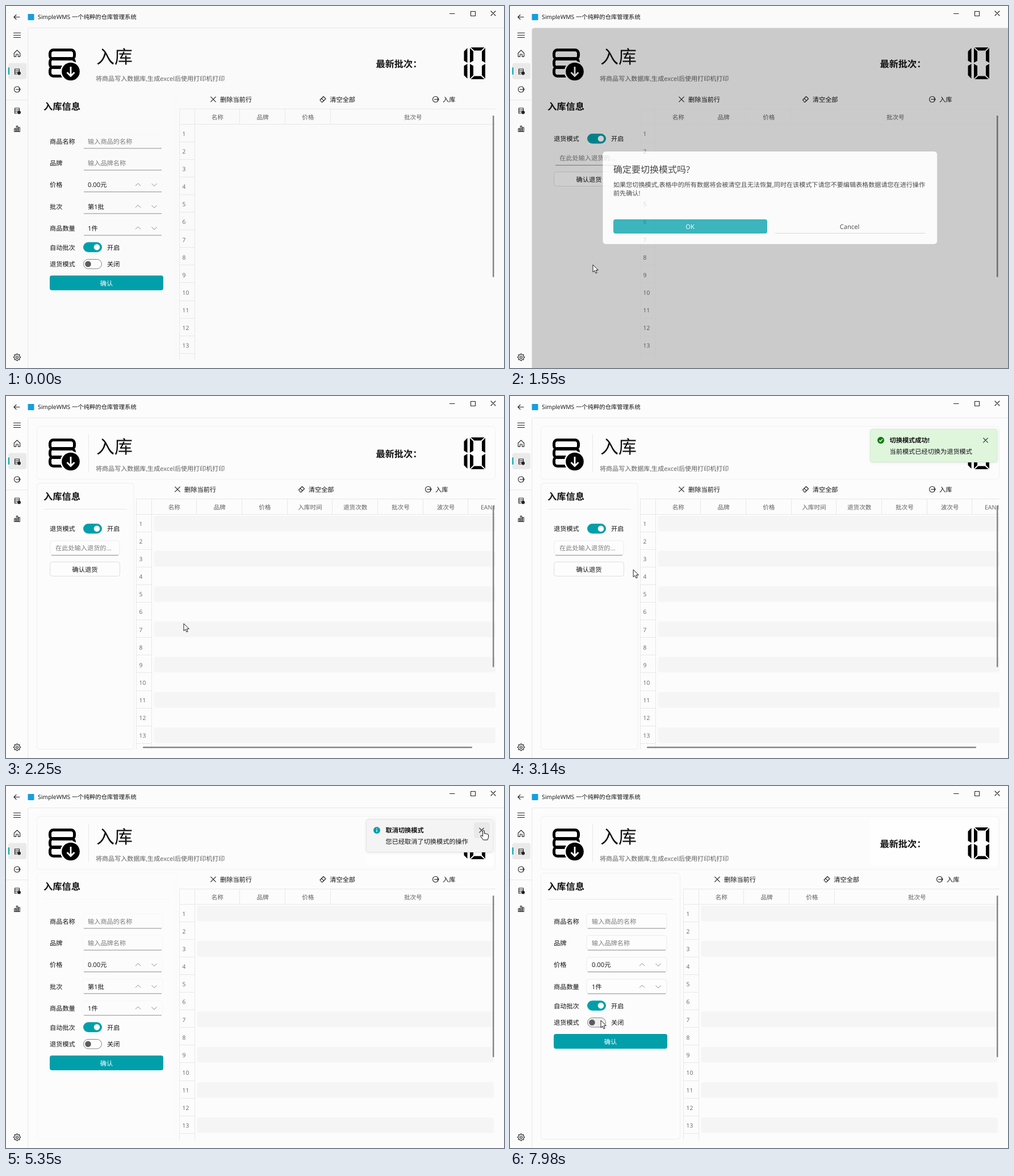
Recreate the animation shown at these times as an HTML page. Size 877 by 638 pixels, loop 8000 ms.

```html
<!DOCTYPE html>
<html lang="zh-CN">
<head>
<meta charset="utf-8">
<title>SimpleWMS</title>
<style>
html, body { margin: 0; width: 100%; height: 100%; overflow: hidden; background: #fafafa; }
svg { display: block; width: 877px; height: 638px; }
text { font-family: "Open Sans", "Noto Sans CJK SC", "Noto Sans CJK", sans-serif; text-rendering: geometricPrecision; white-space: pre; }
.ic { fill: none; stroke: #222; stroke-width: 1.1; stroke-linecap: round; stroke-linejoin: round; }
.line { stroke: #e8e8e8; stroke-width: 1; fill: none; }
</style>
</head>
<body>
<svg id="stage" viewBox="0 0 877 638" xmlns="http://www.w3.org/2000/svg"></svg>
<script>
const LOOP = 8000, TEAL = '#009faa', HOVER = '#29b4bf', ROW = 31.1, COL = 79.7, LIFT = 38;
const $ = id => document.getElementById(id);

// ---- markup helpers; text is placed by its vertical centre, on whole-pixel baselines ----
const text = (x, y, s, { size = 11.2, fill = '#111', anchor = 'start', weight = 400, id = '' } = {}) =>
  `<text ${id && `id="${id}"`} x="${x}" y="${Math.round(y + size * 0.38)}" font-size="${size}" fill="${fill}" text-anchor="${anchor}" font-weight="${weight}">${s}</text>`;
const mid = (x, y, s, o = {}) => text(x, y, s, { anchor: 'middle', ...o });
const rect = (x, y, w, h, fill, rx = 0, more = '') =>
  `<rect x="${x}" y="${y}" width="${w}" height="${h}" rx="${rx}" fill="${fill}" ${more}/>`;
const path = (d, more = 'class="ic"') => `<path d="${d}" ${more}/>`;
const line = d => path(d, 'class="line"');
const group = (id, body, more = '') => `<g id="${id}" ${more}>${body}</g>`;
const at = (x, y, body) => `<g transform="translate(${x} ${y})">${body}</g>`;
const cross = (x, y, r) => path(`M${x - r} ${y - r}l${2 * r} ${2 * r}m0 ${-2 * r}l${-2 * r} ${2 * r}`);

// ---- icons, centred on 0,0 ----
const exitIcon = '<circle r="5" class="ic" stroke-dasharray="27 4.4" stroke-dashoffset="-2.2"/>' + path('M-2 0H5.6M3.4-2.2L5.6 0L3.4 2.2');
const eraser = path('M-5 1L1-5L5-1L-1 5H-2Z M-2.4-1.6L1.6 2.4');
const stack = path('M-4.5-4.5h8v3h-8zM-4.5-1.5h8v3h-8zM-1 4.5h-3.5v-3h4');
const home = path('M-5.2-.5L0-5.6L5.2-.5V5.6H1.8V1.5H-1.8V5.6H-5.2Z');
const bars = path('M-4.8 5V-.5h2.4V5zM-1.2 5V-5h2.4V5zM2.4 5V-2.5h2.4V5z');
const dot = '<circle cx="3" cy="3" r="3" fill="#222"/>';
const gear = () => {
  let d = '';
  for (let i = 0; i < 32; i++) {
    const a = (i - 0.5) * Math.PI / 16, r = i % 4 < 2 ? 6 : 4.6;
    d += `${i ? 'L' : 'M'}${(r * Math.cos(a)).toFixed(2)} ${(r * Math.sin(a)).toFixed(2)}`;
  }
  return path(d + 'Z') + '<circle r="2" class="ic"/>';
};

const chrome = () =>
  line('M38.5 638V42Q38.5 38.5 42.5 38.5H877M0 165.5H38') +
  path('M14 19.5H24M18 15.5L14 19.5L18 23.5') +
  rect(38.5, 14, 11, 11, '#159fe0', 1) +
  text(56, 19, 'SimpleWMS 一个纯粹的仓库管理系统', { size: 10.35 }) +
  path('M781.5 13.5H790M818.5 9.5H826.5V17.5H818.5Z') + cross(858, 13, 4) +
  rect(4, 100.5, 32, 28.5, '#eaeaea', 4) + rect(4, 108, 2, 13, TEAL, 1) +
  path('M13.5 47.5H25.5M13.5 51.5H25.5M13.5 55.5H25.5') +
  at(19.5, 83.5, home) + at(20, 115.5, stack + dot) + at(19.5, 147, exitIcon) +
  at(20, 184.5, stack + dot) + at(19.5, 216.5, bars) + at(19.5, 619, gear());

// ---- LCD digits: each segment is a trapezoid ----
const side = (x, y, dir) => `M${x} ${y}V${y + 26}L${x + 6 * dir} ${y + 22.5}V${y + 6}Z`;
const sideLow = (x, y, dir) => `M${x} ${y}V${y - 26}L${x + 6 * dir} ${y - 22.5}V${y - 6}Z`;
const lcd = () => path(
  side(812.5, 74, -1) + sideLow(812.5, 128, -1) +
  side(817, 74, 1) + sideLow(817, 128, 1) + side(844, 74, -1) + sideLow(844, 128, -1) +
  'M818.5 73H842.5L836.5 78.5H824.5ZM818.5 129H842.5L836.5 123.5H824.5Z', 'fill="#000"');

const header = () => {
  const box = y => rect(77.5, y, 43, 16, 'none', 6, 'stroke="#000" stroke-width="5"');
  return box(77.5) + box(92.5) + box(107.5) +
    '<circle id="halo" cx="114" cy="115.5" r="18.5"/><circle cx="114" cy="115.5" r="15.8"/>' +
    path('M114 107V123M107.5 117L114 123.5L120.5 117', 'fill="none" stroke="#fff" stroke-width="2.8"') +
    text(159, 89, '入库', { size: 32 }) +
    text(158, 128, '将商品写入数据库,生成excel后使用打印机打印', { size: 11.05, fill: '#5f5f5f' }) +
    text(651.5, 101.5, '最新批次：', { size: 16.2, weight: 700 }) + lcd() +
    text(66, 176.5, '入库信息', { size: 16.3, weight: 700 });
};

// ---- form parts ----
const field = (x, y, w, fill = '#fdfdfd') =>
  rect(x, y - 13, w, 26, fill, 4, 'stroke="#ececec" class="soft"') +
  path(`M${x + 2} ${y + 12.6}H${x + w - 2}`, 'stroke="#8f8f8f"');
const label = (y, s) => text(77, y, s);
const input = (y, name, hint) => label(y, name) + field(135, y, 141) + text(144, y, hint, { fill: '#7d7d7d' });
const spin = (y, name, value) => label(y, name) + field(135, y, 141) + text(144, y, value) +
  path(`M228 ${y + 2}l4.5-4.5l4.5 4.5M256.5 ${y - 2}l4.5 4.5l4.5-4.5`, 'fill="none" stroke="#8a8a8a"');
const toggle = (id, y, name) => label(y, name) +
  rect(136.5, y - 8.5, 32, 16.5, TEAL, 8.25, `id="${id}Track"`) +
  `<circle id="${id}Knob" cy="${y - 0.2}" r="5.3"/>` + text(178, y, '', { id: id + 'Text' });

function setToggle(id, on, x, hover) {
  const track = $(id + 'Track'), knob = $(id + 'Knob');
  track.setAttribute('fill', on ? TEAL : hover ? '#efefef' : '#fcfcfc');
  track.setAttribute('stroke', on ? TEAL : '#858585');
  knob.setAttribute('cx', x);
  knob.setAttribute('fill', on ? '#fff' : '#5d5d5d');
  $(id + 'Text').textContent = on ? '开启' : '关闭';
}

const panel = w => rect(54.5, 153.5, w, 469, 'none', 5, 'stroke="#eeeeee" class="soft"') +
  path(`M66 199.5H${54 + w - 12}`, 'class="line soft"');

function table(key, x, cols, wide, bars) {
  const y0 = 181.5, top = 208.5, left = x + 27, right = 862;
  let stripes = '', rules = `M${x} ${y0}H${right}M${x} ${top}H${right}M${x} ${y0}V623M${left} ${y0}V623`, nums = '', heads = '';
  for (let i = 0; i < 13; i++) {
    const y = top + i * ROW;
    if (i % 2 === 0) stripes += rect(left + 4, y + 2.5, (wide ? 862 : 859) - left - 4, 27.5, '#f5f5f5', 4, i === 4 ? `id="${key}Fifth"` : '');
    rules += `M${x} ${Math.round(y + ROW) - 0.5}H${left}`;
    nums += text(x + 5, 225 + i * ROW, i + 1, { size: 10.3, fill: '#666' });
  }
  cols.forEach((s, i) => {
    if (i) rules += `M${Math.round(left + i * COL) - 0.5} ${y0}V${top}`;
    const last = !wide && i === 3;
    heads += mid(last ? (left + 3 * COL + right) / 2 : left + (i + 0.5) * COL - (i > 6 ? 2 : 0), 195.5, s, { size: 10.6, fill: '#606060' });
  });
  const [a, b, c] = bars;
  return `<g class="stripes">${stripes}</g><g class="grid">${line(rules)}</g>${nums}<g clip-path="url(#tableClip)">${heads}</g>` +
    cross(a, 164.5, 4.3) + text(a + 12, 164.3, '删除当前行') +
    at(b, 164.5, eraser) + text(b + 12.3, 164.3, '清空全部') +
    at(c, 164.5, exitIcon) + text(c + 12.5, 164.3, '入库');
}

const scrollbar = rect(857, 193, 2.5, 285, '#868686', 1.2);
const shortCols = ['名称', '品牌', '价格', '批次号'];
const longCols = ['名称', '品牌', '价格', '入库时间', '退货次数', '批次号', '波次号', 'EAN13'];

const stockView = () => panel(245) +
  input(238.3, '商品名称', '输入商品的名称') + input(276.6, '品牌', '输入品牌名称') +
  spin(315, '价格', '0.00元') + group('batch', spin(353.3, '批次', '第1批')) +
  group('lower', spin(391.5, '商品数量', '1件') +
    toggle('auto', 425.3, '自动批次') + toggle('mode', 455, '退货模式') +
    rect(77, 475, 200, 26, TEAL, 4, 'id="confirm"') + mid(177, 488.3, '确认', { fill: '#fff' })) +
  table('stock', 305.5, shortCols, false, [365, 558, 756.5]);

const returnView = () => panel(170.5) + toggle('back', 234, '退货模式') +
  field(78, 268, 122) + text(87, 268, '在此处输入退货的...', { fill: '#7d7d7d' }) +
  rect(77.5, 292.5, 123, 25, '#fdfdfd', 4, 'stroke="#dedede"') + mid(139, 305.5, '确认退货') +
  group('narrow', table('narrow', 229.5, shortCols, false, [302, 520.5, 743.5])) +
  group('broad', table('broad', 229.5, longCols, true, [302, 520.5, 743.5]) + rect(241, 618, 580, 2.5, '#868686', 1.2));

// ---- overlays ----
const toast = (id, fill, edge, color, mark, title, body) => group(id,
  rect(0.5, 0.5, 223.5, 58, fill, 4, `stroke="${edge}" filter="url(#shade)"`) +
  rect(190, 6, 28, 28, '#e9e9e9', 4, `id="${id}Hover" visibility="hidden"`) +
  `<circle cx="19" cy="20" r="6" fill="${color}"/>` + path(mark, 'fill="none" stroke="#fff" stroke-width="1.3"') +
  text(34.5, 20, title, { weight: 700 }) + text(34.5, 39.5, body) + cross(203.5, 20, 3.8));

const box = 'M169.5 256H746Q752.5 256 752.5 262.5V413.5Q752.5 420 746 420H169.5Q163 420 163 413.5V262.5Q163 256 169.5 256Z';
const dialog = () => path(box, 'fill="#fcfcfc" stroke="#9a9a9a" stroke-opacity=".4"') +
  text(182, 287.5, '确定要切换模式吗?', { size: 16 }) +
  text(182, 314.3, '如果您切换模式,表格中的所有数据将会被清空且无法恢复,同时在该模式下请您不要编辑表格数据请您在进行操作', { size: 11.1 }) +
  text(182, 329.3, '前先确认!', { size: 11.1 }) +
  rect(182, 376, 271, 25, TEAL, 4, 'id="ok"') + mid(317, 388.5, 'OK', { fill: '#fff' }) +
  path('M467 400.5H731', 'stroke="#cfcfcf"') + mid(598, 388.5, 'Cancel');

const hint = (id, x, y, w, s) => group(id, rect(x, y, w, 28, '#f9f9f9', 4, 'stroke="#dcdcdc" filter="url(#shade)"') + mid(x + w / 2, y + 14, s));

const pointers =
  group('arrow', path('M0 0V13L3 10.3L5 15L7.2 14L5.2 9.5H9.3Z', 'fill="#fff" stroke="#111" stroke-width=".95"')) +
  group('beam', path('M-3-6.5H-1Q0-6.5 0-5.5Q0-6.5 1-6.5H3M0-5.5V5.5M-3 6.5H-1Q0 6.5 0 5.5Q0 6.5 1 6.5H3', 'fill="none" stroke="#222" stroke-width="1.1"')) +
  group('hand', path('M-1.4.8Q0-1.2 1.4.8V6Q3 4.8 4 6.3Q5.6 5.4 6.3 7Q8.6 6.6 8.6 9V12.5L7 17H-.6L-5 10.8Q-5.4 8.6-3.4 9L-1.4 11Z', 'fill="#fff" stroke="#111" stroke-width="1"'));

// The veil leaves the dialog's own area undimmed.
$('stage').innerHTML =
  '<defs><clipPath id="tableClip"><rect x="229" y="181" width="633" height="28"/></clipPath>' +
  '<filter id="shade" x="-5%" y="-20%" width="110%" height="150%"><feDropShadow dx="0" dy="1" stdDeviation="2" flood-opacity=".08"/></filter></defs>' +
  rect(0, 0, 877, 638, '#fafafa', 0, 'id="ground"') + chrome() +
  group('card', rect(54.5, 53.5, 807, 93.5, 'none', 5, 'stroke="#f1f1f1"') + line('M145.5 67V134')) +
  rect(634, 58, 224, 82, '#fefefe', 0, 'id="patch"') + header() +
  group('stockView', stockView()) + group('returnView', returnView()) + scrollbar +
  path('M39 638V43Q39 39 43 39H877V638Z' + box, 'id="dim" fill-rule="evenodd"') + group('dialog', dialog()) +
  toast('done', '#dff6dd', '#d3ead1', '#0f7b0f', 'M16.3 20.2L18.3 22.2L22 18', '切换模式成功!', '当前模式已经切换为退货模式') +
  toast('info', '#f4f4f4', '#e3e3e3', TEAL, 'M19 19V23.2M19 16.6V17.9', '取消切换模式', '您已经取消了切换模式的操作') +
  hint('autoTip', 66, 373, 276, '开启后将自动使用最新的批次号,无需再手动填写') +
  hint('modeTip', 62, 368, 286, '开启后将切换为退货模式,表格中的所有数据将会被清空') +
  group('pointer', pointers);

// ---- motion ----
const ramp = (t, a, b) => Math.min(1, Math.max(0, (t - a) / (b - a)));
const smooth = p => p * p * (3 - 2 * p);
const outQuad = p => 1 - (1 - p) ** 2;
const mix = (a, b, p) => a + (b - a) * p;
const show = (id, on) => $(id).setAttribute('visibility', on ? 'visible' : 'hidden');
const fade = (id, o) => { $(id).setAttribute('opacity', o); $(id).style.display = o > 0 ? '' : 'none'; };
const move = (id, x, y) => $(id).setAttribute('transform', `translate(${x} ${y})`);
const each = (sel, o) => document.querySelectorAll(sel).forEach(n => n.setAttribute('opacity', o));

const trail = [
  [380, 424, 630], [620, 240, 488], [860, 200, 282], [1180, 146, 456], [1700, 146, 456],
  [2100, 313, 401], [2270, 313, 401], [2530, 266, 361], [2860, 266, 361], [3460, 158, 239.5],
  [4040, 158, 239.5], [4400, 800, 135], [4450, 800, 135], [4700, 841, 78], [5730, 841, 78],
  [6330, 181, 398], [6440, 168, 419], [6560, 160, 413]
];
function pointerAt(t) {
  const i = trail.findIndex(k => k[0] > t);
  if (i === 0) return trail[0].slice(1);
  if (i < 0) return trail[trail.length - 1].slice(1);
  const [t0, x0, y0] = trail[i - 1], [t1, x1, y1] = trail[i];
  const p = smooth(ramp(t, t0, t1));
  return [mix(x0, x1, p), mix(y0, y1, p)];
}

function draw(t) {
  const returning = t >= 1360 && t < 3820;
  const plain = t < 2210, faint = t >= 4300 && t < 5900, tidy = t >= 7450;
  const [px, py] = pointerAt(t);

  const ground = plain ? '#fafafa' : '#fcfcfc';
  $('ground').setAttribute('fill', ground);
  $('halo').setAttribute('fill', ground);
  fade('card', plain ? 0 : 1);
  fade('patch', t >= 5300 ? 1 : 0);
  each('.soft', plain ? 0.15 : faint ? 0.35 : 1);
  each('.stripes', plain ? 0 : 1);
  fade('stockFifth', t >= 4300 ? 0 : 1);

  $('stockView').style.display = returning ? 'none' : '';
  $('returnView').style.display = returning ? '' : 'none';
  $('narrow').style.display = plain ? '' : 'none';
  $('broad').style.display = plain ? 'none' : '';

  fade('batch', tidy ? 0 : 1);
  move('lower', 0, tidy ? -LIFT : 0);
  const autoOn = t < 7000 || tidy;
  const autoPos = tidy ? ramp(t, 7400, 7500) : 1 - ramp(t, 7000, 7120);
  setToggle('auto', autoOn, mix(144.5, 160, autoPos));
  const modeX = t >= 3820 ? mix(160, 144.5, ramp(t, 3836, 3956)) : 144.5;
  setToggle('mode', false, modeX, (t > 1130 && t < 1360) || tidy);
  setToggle('back', true, mix(144.5, 160, ramp(t, 1370, 1490)));
  const overConfirm = px > 77 && px < 277 && py > 475 && py < 501;
  $('confirm').setAttribute('fill', overConfirm && t > 380 && t < 1200 ? HOVER : TEAL);

  const veil = ramp(t, 1400, 1600) * (1 - ramp(t, 2175, 2245));
  fade('dim', veil * 0.25);
  fade('dialog', veil);
  each('.grid', 1 - veil);
  $('ok').setAttribute('fill', py < 402 && px > 182 && t > 2000 ? HOVER : TEAL);

  move('done', mix(877, 634, outQuad(ramp(t, 2320, 2530))), 58);
  fade('done', t < 2320 ? 0 : 1 - ramp(t, 4750, 4950));
  show('doneHover', t >= 4640 && t < 4950);
  move('info', mix(877, 634, outQuad(ramp(t, 3833, 4033))), mix(129, 58, outQuad(ramp(t, 4980, 5240))));
  fade('info', t < 3833 ? 0 : 1 - ramp(t, 5530, 5730));
  show('infoHover', t >= 5300 && t < 5730);

  fade('autoTip', t < 7000 ? ramp(t, 6740, 6900) : 0);
  fade('modeTip', t < 7975 ? ramp(t, 7770, 7930) : 0);

  const beam = t >= 3820 && t < 4090, hand = t >= 4640 && t < 5760;
  move('pointer', px, py);
  fade('pointer', t < 380 ? 0 : 1);
  fade('beam', beam ? 1 : 0);
  fade('hand', hand ? 1 : 0);
  fade('arrow', beam || hand ? 0 : 1);
}

const start = performance.now();
function tick() {
  draw((performance.now() - start) % LOOP);
  requestAnimationFrame(tick);
}
tick();
</script>
</body>
</html>
```
